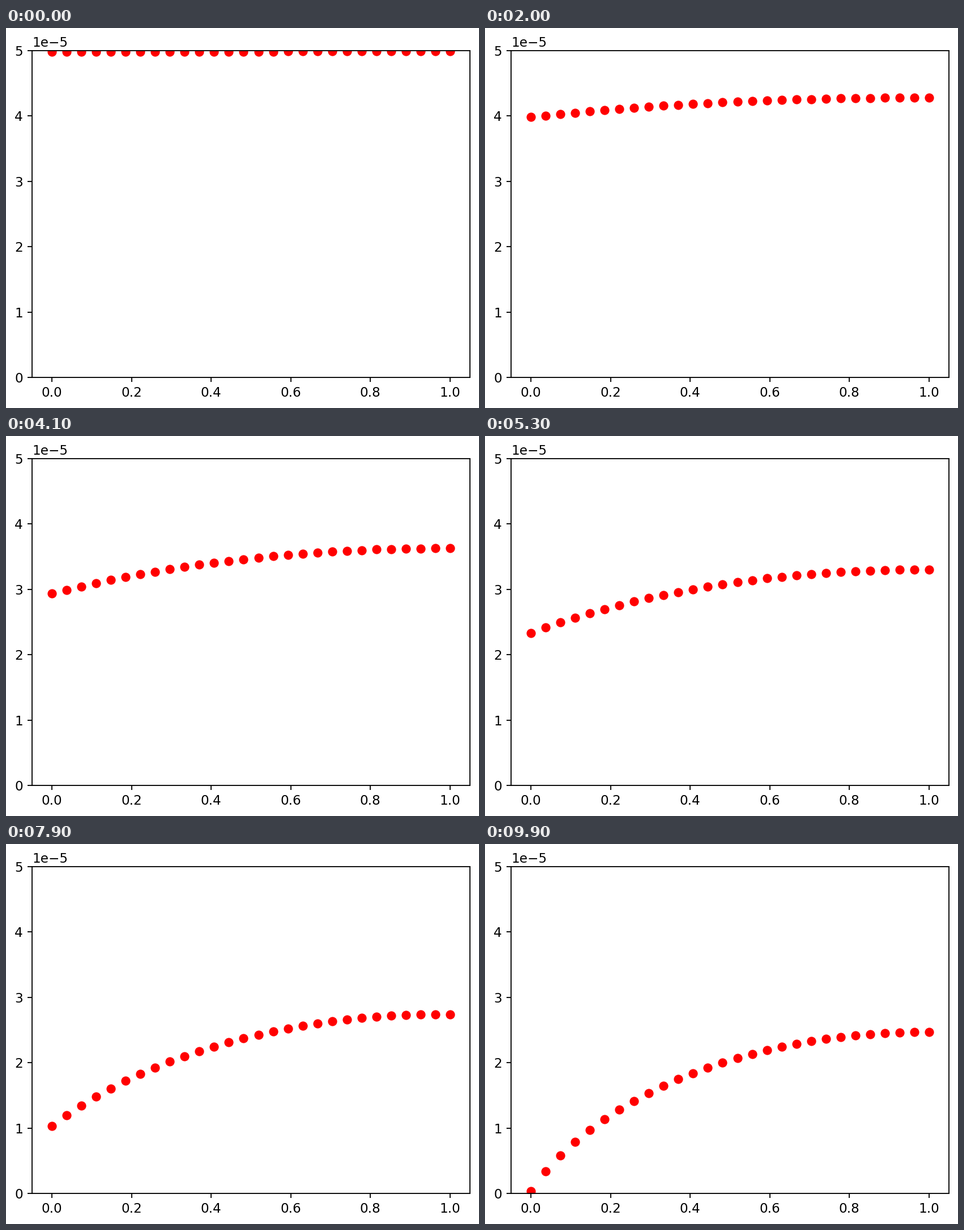
Write a matplotlib script that moves like this. It is 835 by 671 pixels and loops after 10 s.

```python
import numpy as np
import matplotlib.pyplot as plt
from matplotlib.animation import FuncAnimation

W, H, DPI = 835, 671, 166.5
FRAMES, INTERVAL = 100, 100
STEPS = 3            # time steps per frame
NODES = 28
START = 5.0          # initial radius, in units of 1e-5
RATE = START / (FRAMES * STEPS)
REACTION = 17.08     # reaction / diffusion ratio


def concentration(r, h):
    """Solve c'' = K c / r^2 with c = 1 at the mouth, no flux at the far end."""
    c = np.ones(NODES)
    for i in range(NODES - 2, 0, -1):
        c[i - 1] = 2 * c[i] - c[i + 1] + h * h * REACTION * c[i] / r[i] ** 2
    return c / c[0]


def simulate(x):
    """Radius profile for each frame while the wall grows inwards."""
    r = np.full(NODES, START)
    h = x[1] - x[0]
    profiles = []
    for k in range(FRAMES * STEPS):
        r = r - RATE * concentration(r, h)
        if k % STEPS == 0:
            profiles.append(r)
    return np.array(profiles) * 1e-5


x = np.linspace(0, 1, NODES)
profiles = simulate(x)

fig = plt.figure(figsize=((W + 0.01) / DPI, (H + 0.01) / DPI), dpi=DPI,
                 facecolor="white")
ax = fig.add_axes([46 / W, 54 / H, 773 / W, 577 / H])
ax.set_xlim(-0.05, 1.05)
ax.set_ylim(0, START * 1e-5)
ax.set_xticks(np.linspace(0, 1, 6))
ax.set_yticks(np.arange(6) * 1e-5)
dots, = ax.plot(x, profiles[0], "ro")


def draw(n):
    dots.set_ydata(profiles[n])
    return dots,


anim = FuncAnimation(fig, draw, frames=FRAMES, interval=INTERVAL,
                     repeat=True, repeat_delay=0)
plt.show()
```
